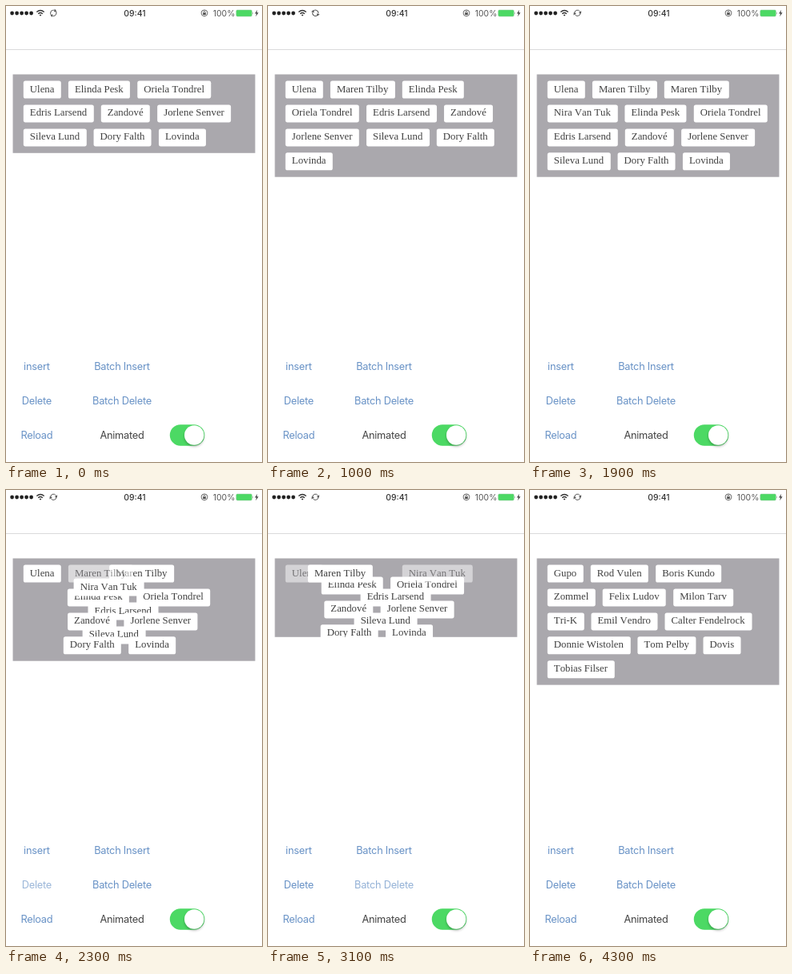
An HTML page that plays this animation: 320 px wide and 570 px high, repeating every 4.4 s.

```html
<!DOCTYPE html>
<html lang="en">
<head>
<meta charset="utf-8">
<title>Tag list</title>
<style>
  html, body { margin: 0; width: 100%; height: 100%; overflow: hidden; background: #fff; }
  #stage { position: relative; width: 320px; height: 570px; overflow: hidden; }
  svg { position: absolute; left: 0; top: 0; }
  svg text { font-family: Inter, Roboto, sans-serif; text-anchor: middle; }
  .label { font-size: 12.8px; letter-spacing: -.25px; fill: #444; }
  .button { fill: #6892c6; }
  .status { font-size: 10.4px; fill: #333; }
  #knob { filter: drop-shadow(0 2px 1.5px rgba(0, 0, 0, .25)); }
  #list { position: absolute; left: 8.53px; top: 85.46px; width: 302.93px; overflow: hidden; }
  .tag {
    position: absolute; left: 0; top: 0; box-sizing: border-box;
    height: 21.4px; padding: 0 8.53px; border-radius: 2.6px;
    background: #fff; color: #404040; white-space: nowrap;
    font: 12.8px/21.4px "Liberation Serif", "Times New Roman", serif;
    font-kerning: none;
  }
</style>
</head>
<body>
<div id="stage">
  <svg width="320" height="570" viewBox="0 0 320 570">
    <path d="M0 54.5H320" stroke="#dadadc"/>
    <rect id="panel" x="8.53" y="85.46" width="302.93" fill="#aaa8ad"/>
    <g id="signal" fill="#222"></g>
    <g fill="none" stroke="#333" stroke-width="1.4">
      <path d="M38.3 7.6Q43 3.4 47.7 7.6M40.2 9.7Q43 7.2 45.8 9.7"/>
      <path d="M43 10.6L44.4 11.3L43 12.8L41.6 11.3Z" fill="#333" stroke="none"/>
    </g>
    <g id="sync" fill="none" stroke="#555" stroke-width=".9">
      <path d="M-3.4 1.2A3.6 3.6 0 0 1 2.4 -2.7M3.4 -1.2A3.6 3.6 0 0 1 -2.4 2.7"/>
      <path d="M1.2 -.9L4.6 -.4L4 -3.8ZM-1.2 .9L-4.6 .4L-4 3.8Z" fill="#555" stroke="none"/>
    </g>
    <text class="status" x="161" y="12.6" font-weight="500">09:41</text>
    <circle cx="248" cy="8.8" r="3.9" fill="none" stroke="#555" stroke-width=".9"/>
    <path d="M246.2 8.5H249.8V11H246.2Z" fill="#444"/>
    <path d="M246.9 8.6V7.6A1.1 1.1 0 0 1 249.1 7.6V8.6" fill="none" stroke="#444" stroke-width=".7"/>
    <text class="status" x="272.6" y="12.6" style="fill:#555">100%</text>
    <rect x="287.8" y="5" width="19.6" height="8" rx="1.4" fill="#4cd964" stroke="#8fc79a" stroke-width=".5"/>
    <path d="M308.4 7.4Q309.8 9 308.4 10.6Z" fill="#777"/>
    <path d="M314.2 4.8L311 9.4H313L312.2 13.2L315.6 8.2H313.5Z" fill="#444"/>

    <text class="label button" id="insert" x="38.4" y="455.3">insert</text>
    <text class="label button" id="batchInsert" x="145" y="455.3">Batch Insert</text>
    <text class="label button" id="delete" x="38.4" y="498.3">Delete</text>
    <text class="label button" id="batchDelete" x="145" y="498.3">Batch Delete</text>
    <text class="label button" id="reload" x="38.4" y="541">Reload</text>
    <text class="label" x="145" y="541">Animated</text>
    <rect x="204.8" y="523.2" width="43.5" height="26.5" rx="13.25" fill="#4cd964"/>
    <circle id="knob" cx="235.2" cy="536.5" r="12.2" fill="#fff"/>
  </svg>
  <div id="list"></div>
</div>
<script>
const LOOP = 4400, FRAME = 100, MOVE = 300, PRESS = 130, RELEASE = 235;
const GAP = 8.53, INSET = 12.8, TAG_HEIGHT = 21.4, LIST_WIDTH = 302.93;
const $ = id => document.getElementById(id);
const clamp = v => Math.max(0, Math.min(1, v));
const ease = p => p * p * (3 - 2 * p);

// Tags in stacking order: later arrivals lie on top.
const names = ['Ulena', 'Elinda Pesk', 'Oriela Tondrel', 'Edris Larsend', 'Zandové',
  'Jorlene Senver', 'Sileva Lund', 'Dory Falth', 'Lovinda',
  'Maren Tilby', 'Maren Tilby', 'Nira Van Tuk',
  'Gupo', 'Rod Vulen', 'Boris Kundo', 'Zommel', 'Felix Ludov', 'Milon Tarv', 'Tri-K',
  'Emil Vendro', 'Calter Fendelrock', 'Donnie Wistolen', 'Tom Pelby', 'Dovis', 'Tobias Filser'];
const range = (from, to) => Array.from({ length: to - from + 1 }, (_, i) => from + i);
const rest = range(1, 8);

// Each step: start time, pressed button, resulting order, offsets of arriving tags.
const steps = [
  { at: -1000, order: [0, ...rest] },
  { at: 570, button: 'insert', order: [0, 9, ...rest], from: { 9: [-17, -7.5] }, resizeDelay: 100 },
  { at: 1433, button: 'batchInsert', order: [0, 10, 9, 11, ...rest], from: { 10: [-17, -7.5], 11: [146, -37] } },
  { at: 2164, button: 'delete', order: [0, 9, 11, ...rest] },
  { at: 2950, button: 'batchDelete', order: [9, ...rest] },
  { at: 3800, button: 'reload', order: range(12, 24), instant: true }
];

const list = $('list');
const tags = names.map(name => {
  const el = document.createElement('div');
  el.className = 'tag';
  el.textContent = name;
  list.append(el);
  return { el, width: el.getBoundingClientRect().width };
});

function layout(step) {
  let x = INSET, y = GAP;
  step.place = {};
  for (const id of step.order) {
    const { width } = tags[id];
    if (x + width > LIST_WIDTH - INSET) {
      x = INSET;
      y += TAG_HEIGHT + GAP;
    }
    step.place[id] = [x, y];
    x += width + GAP;
  }
  step.height = y + TAG_HEIGHT + GAP;
}
steps.forEach(layout);

for (let i = 0; i < 5; i++)
  $('signal').innerHTML += `<circle cx="${7.6 + i * 6}" cy="9" r="2.4"/>`;

function drawTag({ el }, id, before, step, k) {
  const a = before.place[id], b = step.place[id];
  let start = a, end = b, alpha = 1;
  if (!a && b) {
    const [dx, dy] = step.from?.[id] || [0, 0];
    start = [b[0] + dx, b[1] + dy];
    alpha = k;
  } else if (a && !b) {
    end = a;
    alpha = 1 - k;
  } else if (!a) {
    alpha = 0;
  }
  el.style.visibility = alpha > 0 ? 'visible' : 'hidden';
  if (!alpha) return;
  const [x, y] = start.map((v, i) => v + (end[i] - v) * k);
  el.style.opacity = alpha;
  el.style.transform = `translate(${x}px, ${y}px)`;
}

function render(t) {
  const index = steps.findLastIndex(s => s.at <= t);
  const step = steps[index], before = steps[Math.max(0, index - 1)];
  const k = step.instant ? 1 : ease(clamp((t - step.at) / MOVE));
  tags.forEach((tag, id) => drawTag(tag, id, before, step, k));
  const resized = t >= step.at + (step.resizeDelay || 0);
  const { height } = resized ? step : before;
  list.style.height = height + 'px';
  $('panel').setAttribute('height', height);
  for (const { at, button } of steps)
    if (button) $(button).style.opacity = t < at - PRESS ? 1 : .2 + .8 * clamp((t - at) / RELEASE);
  $('sync').setAttribute('transform', `translate(59.3 8.8) rotate(${150 - t * .45})`);
}

const began = performance.now();
function tick() {
  const t = (performance.now() - began) % LOOP;
  render(Math.floor(t / FRAME) * FRAME);
  requestAnimationFrame(tick);
}
tick();
</script>
</body>
</html>
```
